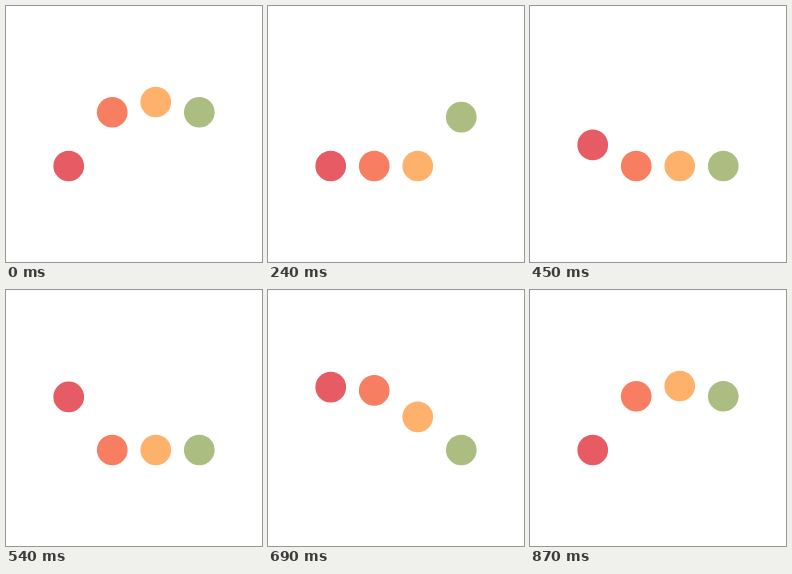
Recreate the animation shown at these times as an HTML page. Size 256 by 256 pixels, loop 0.9 s.

```html
<!DOCTYPE html>
<html lang="en">
<head>
<meta charset="utf-8">
<title>Bouncing dots</title>
<style>
  html, body { margin: 0; width: 100%; height: 100%; overflow: hidden; background: #fff; }
  svg { display: block; width: 100vw; height: 100vh; }
</style>
</head>
<body>
<svg viewBox="0 0 100 100">
  <circle cx="24.5" cy="62.5" r="6" fill="#e65b64"/>
  <circle cx="41.5" cy="62.5" r="6" fill="#f87e61"/>
  <circle cx="58.5" cy="62.5" r="6" fill="#fdb16b"/>
  <circle cx="75.5" cy="62.5" r="6" fill="#abbd81"/>
</svg>
<script>
const LOOP = 900, STEP = 30, LAST = LOOP / STEP - 1;
const FLOOR = 62.5, HEIGHT = 25;
const dots = document.querySelectorAll('circle');

// cubic-bezier(0, .5, .5, 1), solved by bisection
function easeOut(x) {
  let lo = 0, hi = 1;
  for (let i = 0; i < 24; i++) {
    const s = (lo + hi) / 2;
    if (1.5 * s * s - 0.5 * s ** 3 < x) lo = s; else hi = s;
  }
  return 1.5 * lo - 0.5 * lo ** 3;
}

// Rise for a quarter cycle, fall for a quarter, then rest.
function lift(p) {
  if (p >= 0.5) return 0;
  return easeOut(p < 0.25 ? p * 4 : 2 - p * 4);
}

function draw(ms) {
  // The last step completes the cycle, so it equals the first.
  const cycle = Math.floor(((ms + 0.5) % LOOP) / STEP) / LAST;
  dots.forEach((dot, i) => {
    const phase = (cycle + 0.5 - i / 8) % 1;
    dot.setAttribute('cy', FLOOR - HEIGHT * lift(phase));
  });
}

function tick() {
  draw(performance.now());
  requestAnimationFrame(tick);
}

draw(0);
requestAnimationFrame(tick);
</script>
</body>
</html>
```
